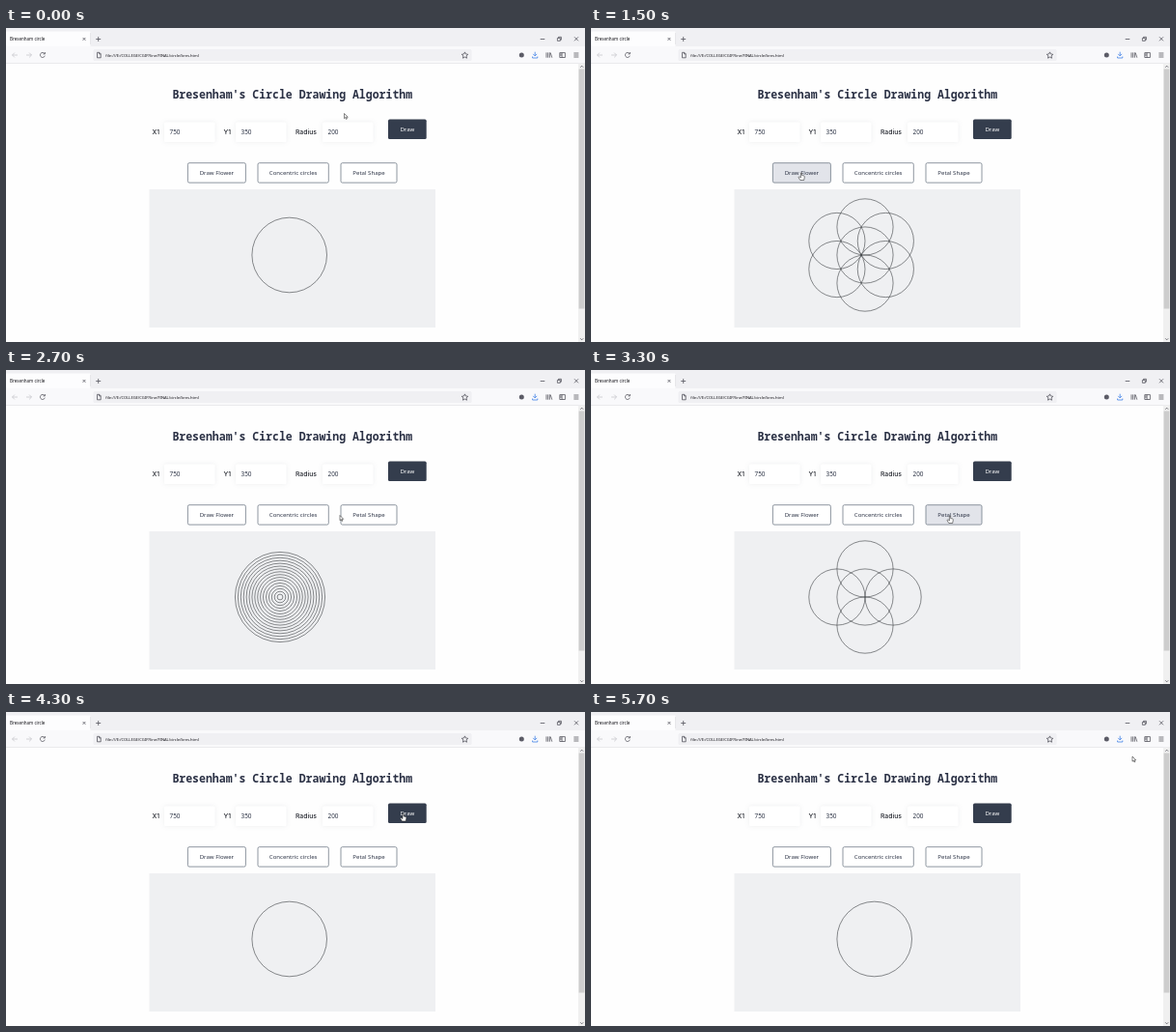
Animation, 600 px wide and 325 px high, one loop 5800 ms. Source, as an HTML page:

```html
<!DOCTYPE html>
<html lang="en">
<head>
<meta charset="utf-8">
<title>Bresenham circle</title>
<style>
  html, body { margin: 0; width: 100%; height: 100%; overflow: hidden; background: #fefefe; }
  svg { display: block; width: 100vw; height: 100vh; }
  text { font-family: "Noto Sans", "Open Sans", sans-serif; fill: #2d3446; }
  .title { font: bold 11.52px "Noto Sans Mono", "Liberation Mono", monospace; fill: #2b3145; }
  .label { font: 500 6.8px Inter, sans-serif; fill: #22252d; }
  .value { font-size: 6.4px; }
  .caption { font-size: 6.05px; text-anchor: middle; }
  .light { fill: #fff; }
  .small { font-size: 4.5px; fill: #15141a; }
  .url { font-size: 4.05px; fill: #15141a; }
  .field { fill: #fff; filter: drop-shadow(0 0 2.5px rgba(70, 75, 90, .09)); }
  .outlined { fill: #fff; stroke: #727b88; stroke-width: .8; }
  .outlined.hover { fill: #e2e4ea; }
  .icon { fill: none; stroke: #4b4b55; stroke-width: .75; }
  .faint { stroke: #c3c3c8; }
  .blue { stroke: #3478e5; }
  .drawing { fill: none; stroke: #3c3e42; stroke-width: .6; }
</style>
</head>
<body>
<svg viewBox="0 0 600 325" preserveAspectRatio="none">
  <rect width="600" height="325" fill="#fefefe"/>

  <!-- Browser window -->
  <rect width="600" height="19" fill="#f0f0f3"/>
  <rect y="19" width="600" height="17" fill="#f9f9fb"/>
  <rect y="36" width="600" height=".6" fill="#dedee3"/>
  <rect y="3.5" width="87.5" height="15.5" rx="1" fill="#fdfdfe"/>
  <path d="M87.5 5V17" stroke="#d7d7dc" stroke-width=".5"/>
  <text class="small" x="4" y="13.3">Bresenham circle</text>
  <rect x="90.5" y="22" width="392" height="12" rx="1.5" fill="#f0f0f3"/>
  <text class="url" x="103.3" y="29.9">file:///E:/COLLEGE/CGIP/line/FINAL/circle/bres.html</text>
  <path class="icon" d="M79.6 10l2.8 2.8m0-2.8l-2.8 2.8M93.2 11.5h5m-2.5-2.5v5M553.7 11.5h4.6M589 9.3l4 4m0-4l-4 4M571.4 10.4h2.9v2.9h-2.9zM572.5 10.4v-1.1h2.9v2.9h-1.1"/>
  <path class="icon faint" d="M12 28H6.5m2.4-2.4L6.5 28l2.4 2.4M21 28h5.5m-2.4-2.4l2.4 2.4-2.4 2.4"/>
  <path class="icon" d="M39.8 26.3a2.5 2.5 0 1 0 .5 2.4M40.4 25v1.9h-1.9M94.5 25.3h2.2l1.5 1.5v4h-3.7zM96.6 25.3v1.6h1.6"/>
  <path class="icon" d="M475.5 24.9l1 2.1 2.3.3-1.7 1.6.4 2.3-2-1.1-2 1.1.4-2.3-1.7-1.6 2.3-.3z"/>
  <circle cx="534.3" cy="28" r="2.5" fill="#5b5b66"/>
  <path class="icon blue" d="M548.2 24.7v4.1m-2-1.9l2 2 2-2M545.6 29.5v1.5h5.2v-1.5"/>
  <path class="icon" d="M560 25.4v5.3m1.7-5.3v5.3m1.7-5.3v5.3m.8-5.2l1.6 5.2M573.8 25.6h5.6v4.9h-5.6zM576.1 25.6v4.9M574.2 27h1.5m-1.5 1.2h1.5M588.4 26h5m-5 2h5m-5 2h5"/>
  <rect x="593" y="36.6" width="7" height="289" fill="#f0f0f0"/>
  <rect x="593.6" y="42.5" width="5.8" height="248" fill="#cdcdcd"/>
  <path class="icon" d="M595.2 40.7l1.5-1.5 1.5 1.5M595.2 321.3l1.5 1.5 1.5-1.5"/>

  <!-- Page -->
  <text class="title" x="172.4" y="73">Bresenham's Circle Drawing Algorithm</text>
  <g id="fields"></g>
  <g id="buttons"></g>
  <rect x="148.5" y="167" width="296.5" height="143" fill="#eff0f2"/>
  <g id="single" class="drawing"></g>
  <g id="flower" class="drawing"></g>
  <g id="rings" class="drawing"></g>
  <g id="petals" class="drawing"></g>

  <g id="pointer" stroke="#222" stroke-width=".55" stroke-linejoin="round" fill="#fff">
    <path id="arrow" d="M0 0V5.2L1.2 4.1 2 5.9 2.9 5.5 2.1 3.8H3.7Z"/>
    <path id="hand" d="M-.6 .5Q0-.4.6.5V3L2.7 3.5Q3.4 3.7 3.3 4.6L2.7 8H-1.2L-2.9 5.2Q-2.8 4-1.7 4.6L-.6 5.5Z"/>
  </g>
</svg>

<script>
const LOOP = 5800, STEP = 100;
const byId = id => document.getElementById(id);

function add(parent, tag, attrs, content = "") {
  const node = document.createElementNS("http://www.w3.org/2000/svg", tag);
  for (const name in attrs) node.setAttribute(name, attrs[name]);
  node.textContent = content;
  return byId(parent).appendChild(node);
}

for (const [label, value, labelX, x] of [["X1", 750, 151.5, 164], ["Y1", 350, 225.6, 238], ["Radius", 200, 300, 328]]) {
  add("fields", "text", { class: "label", x: labelX, y: 110 }, label);
  add("fields", "rect", { class: "field", x, y: 97.5, width: 52.5, height: 20.5, rx: 1.5 });
  add("fields", "text", { class: "value", x: x + 5.5, y: 110.1 }, value);
}

const buttons = [
  ["Draw", 396, 94.6, 39.7, true],
  ["Draw Flower", 188.4, 139.7, 60],
  ["Concentric circles", 261, 139.7, 73.3],
  ["Petal Shape", 347, 139.7, 58]
].map(([name, x, y, width, solid]) => {
  const height = 20.4;
  const box = add("buttons", "rect", { x, y, width, height, rx: 1.6, class: solid ? "solid" : "outlined" });
  if (solid) box.setAttribute("fill", "#343d4d");
  add("buttons", "text", { x: x + width / 2, y: y + 12.5, class: solid ? "caption light" : "caption" }, name);
  return { box, contains: (px, py) => px >= x && px <= x + width && py >= y && py <= y + height };
});

// Drawings use canvas units, scaled to the visible canvas.
const SCALE = 0.194;
const circle = (group, x, y, r) => add(group, "circle", {
  cx: 148.2 + x * SCALE, cy: 167.1 + y * SCALE, r: r * SCALE
});
const around = (group, offsets) => offsets.forEach(([dx, dy]) => circle(group, 700 + dx, 350 + dy, 150));
const cross = [[0, 0], [0, -150], [0, 150]];

circle("single", 750, 350, 200);
around("flower", [...cross, [-150, -75], [-150, 75], [110, -75], [110, 75]]);
around("petals", [...cross, [-150, 0], [150, 0]]);
for (let r = 15; r <= 240; r += 15) circle("rings", 700, 350, r);

const scenes = [[0, "single"], [1200, "flower"], [2400, "rings"], [3300, "petals"], [4100, "single"]];

// Pointer path: time, x, y
const path = [
  [0, 350.5, 88.5], [300, 350.5, 88.5], [500, 300, 114], [700, 228, 147], [800, 218, 149.5],
  [1600, 218, 149.5], [1900, 285, 151], [2500, 286, 151], [2700, 346, 150.5], [2900, 372, 150.5],
  [3400, 372, 150.5], [3700, 407, 110], [3900, 410, 107], [4400, 412, 104.5],
  [4600, 480, 74], [4800, 541, 53.5], [5000, 552.5, 52.5], [5500, 561, 46], [LOOP, 561, 46]
];

function pointerAt(t) {
  const next = path.findIndex(point => point[0] > t);
  const [t0, x0, y0] = path[next - 1], [t1, x1, y1] = path[next];
  const k = (t - t0) / (t1 - t0);
  return [x0 + (x1 - x0) * k, y0 + (y1 - y0) * k];
}

function render(now) {
  const t = Math.floor(now % LOOP / STEP) * STEP;
  const [x, y] = pointerAt(t);
  const hovered = buttons.find(button => button.contains(x, y));
  for (const button of buttons) button.box.classList.toggle("hover", button === hovered);
  byId("pointer").setAttribute("transform", `translate(${x} ${y})`);
  byId("arrow").style.display = hovered ? "none" : "";
  byId("hand").style.display = hovered ? "" : "none";

  const current = scenes.filter(([start]) => start <= t).pop()[1];
  for (const [, name] of scenes) byId(name).style.display = name === current ? "" : "none";
}

const start = performance.now();
function tick() {
  render(performance.now() - start);
  requestAnimationFrame(tick);
}
tick();
</script>
</body>
</html>
```
